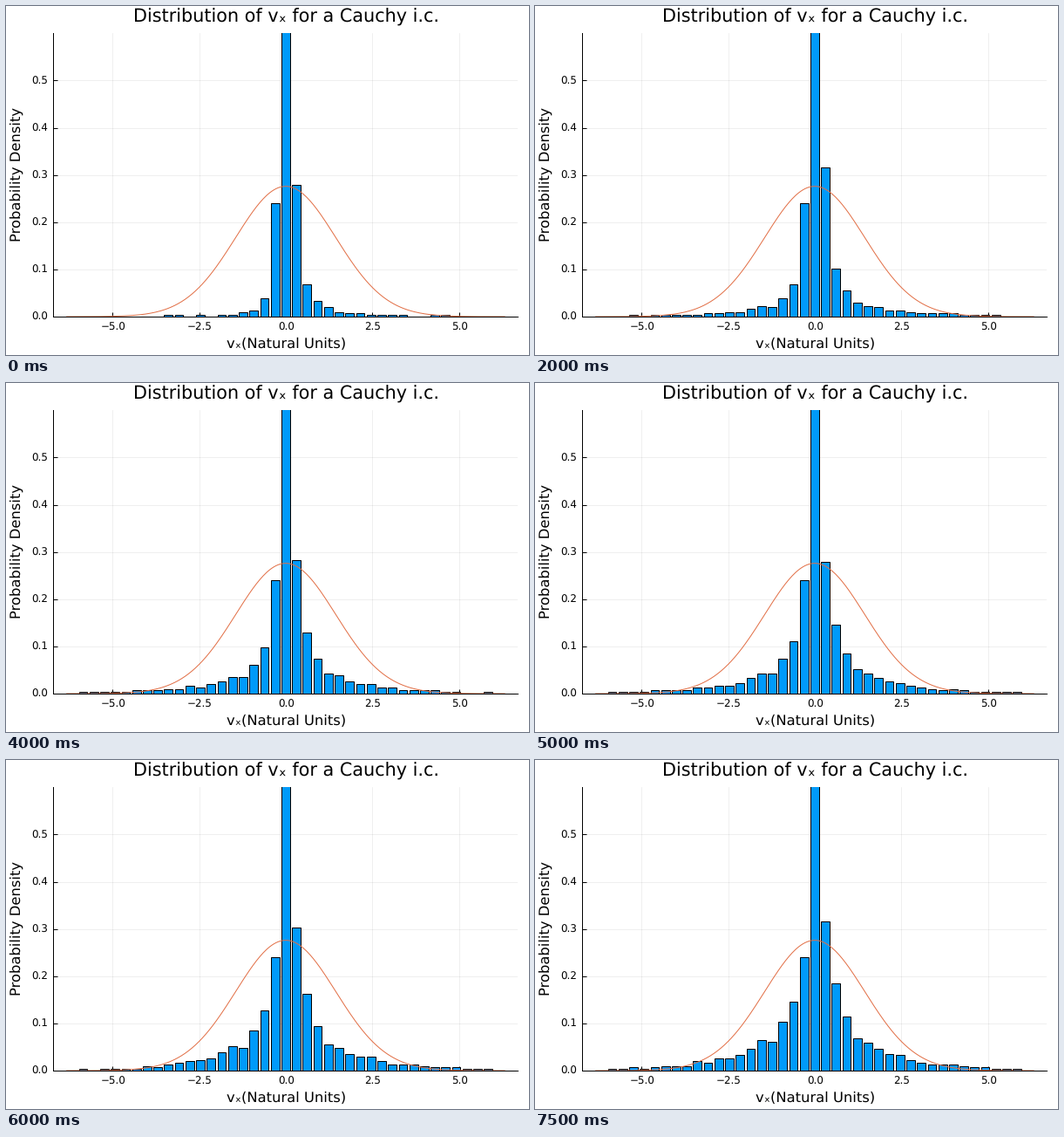
These frames come from a looping animation (600 px wide and 400 px high, 8 s). A matplotlib script:

```python
import numpy as np
import matplotlib.pyplot as plt
from matplotlib.animation import FuncAnimation

W, H, DPI = 600, 400, 100
PX = 72 / DPI                     # one pixel in points
FRAMES, INTERVAL = 16, 500
BINS = 39
STEP = 12 / BINS
SAMPLES = 1000
SIGMA = 1.445
MINUS = "\u2212"

plt.rcParams["font.family"] = "DejaVu Sans"
plt.rcParams["text.hinting"] = "none"

index = np.arange(BINS) - BINS // 2


def build_counts():
    """Counts per time step: a Cauchy peak leaking into growing tails."""
    rng = np.random.default_rng(4)
    t = np.arange(FRAMES)[:, None]
    k = np.maximum(np.abs(index), 1)
    right = index > 0

    # The bin right of the centre swings, the left one stays level
    swing = 91.5 + 6 * np.cos(2 * np.pi * (t - 4.2) / 10)
    inner = np.where(right, swing, 74)
    start = np.where(right, 86 / k**2, 71 / k**2.5)
    gain = np.where(right, 45 * np.exp(-k / 4.5), 40 * np.exp(-k / 5))
    gain = gain * rng.uniform(0.75, 1.25, BINS)

    mean = np.where(k == 1, inner, start + gain * t / (FRAMES - 1))
    counts = np.floor(mean + rng.random(mean.shape))
    counts[:, index == 0] = SAMPLES / 2
    return counts


heights = build_counts() / (SAMPLES * STEP)

fig = plt.figure(figsize=(W / DPI, H / DPI), dpi=DPI, facecolor="white")
ax = fig.add_axes([54.4 / W, 44 / H, 533 / W, 324.6 / H])
ax.set_xlim(-6.704, 6.704)
ax.set_ylim(0, 0.6)
ax.set_axisbelow(True)
ax.spines[["top", "right"]].set_visible(False)
for side in ("left", "bottom"):
    ax.spines[side].set_linewidth(PX)

xticks = np.arange(-5, 5.1, 2.5)
yticks = np.arange(6) / 10
ax.set_xticks(xticks, [""] * len(xticks))
ax.set_yticks(yticks, [""] * len(yticks))
ax.tick_params(direction="in", length=5 * PX, width=PX)
ax.grid(color="black", alpha=0.1, linewidth=0.6 * PX)


def label(x, y, text, size, ha="center", rotation=0):
    """Text with its baseline at pixel (x, y), counted from the top left."""
    fig.text(x / W, 1 - y / H, text, fontsize=size * PX, ha=ha,
             va="baseline", rotation=rotation, rotation_mode="anchor")


label(321.9, 18.5, "Distribution of vₓ for a Cauchy i.c.", 20.8)
label(321.5, 391.7, "vₓ(Natural Units)", 16.4)
label(16.5, 193.3, "Probability Density", 16.4, rotation=90)
for v in xticks:
    label(321.5 + v * 39.75, 371.5, f"{v:.1f}".replace("-", MINUS), 11.95)
for v in yticks:
    label(47.7, 359.9 - v * 541, f"{v:.1f}", 11.95, ha="right")

bars = ax.bar(index * STEP, heights[0], width=0.8 * STEP, color="#009AFA",
              edgecolor="black", linewidth=PX, zorder=2)
x = np.linspace(-6.32, 6.32, 253)
ax.plot(x, np.exp(-x**2 / (2 * SIGMA**2)) / (SIGMA * np.sqrt(2 * np.pi)),
        color="#E26F46", linewidth=PX, zorder=2.4)


def update(i):
    for bar, h in zip(bars, heights[i]):
        bar.set_height(h)
    return list(bars)


anim = FuncAnimation(fig, update, frames=FRAMES, interval=INTERVAL,
                     repeat=True, repeat_delay=0, blit=False)
plt.show()
```
